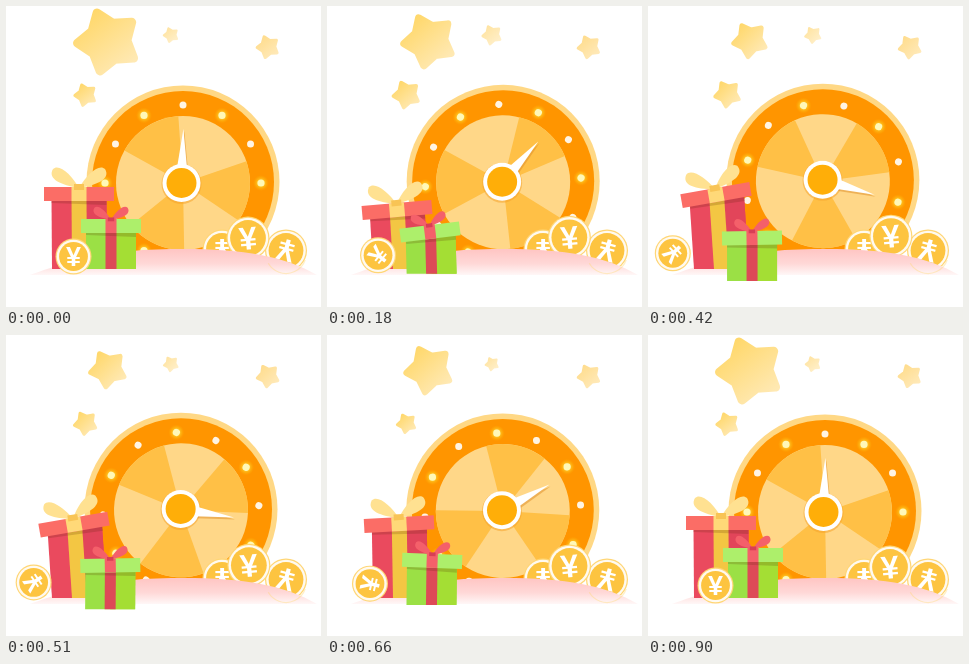
These frames come from a looping animation (315x301 px, 0.93 s). An HTML page with a canvas:

```html
<!DOCTYPE html>
<html lang="en">
<head>
<meta charset="utf-8">
<style>
  html, body { margin: 0; width: 100%; height: 100%; overflow: hidden; background: #fff; }
  canvas { display: block; }
</style>
</head>
<body>
<canvas id="stage" width="315" height="301"></canvas>
<script>
const c = document.getElementById('stage').getContext('2d');
const LOOP = 930, STEP = 30, PEAK = 450, END = 900;
const TIMES = [0, 180, 300, 420, 570, 780, 900];
const SECTORS = [-4, 71, 124, 179, 231, 299, 356];
const rad = deg => deg * Math.PI / 180;

function track(t, values) {
  let i = 0;
  while (i < TIMES.length - 2 && t > TIMES[i + 1]) i++;
  const k = (t - TIMES[i]) / (TIMES[i + 1] - TIMES[i]);
  return values[i] + (values[i + 1] - values[i]) * k;
}

function at(x, y, deg, draw) {
  c.save();
  c.translate(x, y);
  c.rotate(rad(deg));
  draw();
  c.restore();
}

function disc(x, y, r, fill) {
  c.beginPath();
  c.arc(x, y, r, 0, 2 * Math.PI);
  c.fillStyle = fill;
  c.fill();
}

function poly(points, fill) {
  c.beginPath();
  points.forEach(p => c.lineTo(...p));
  c.closePath();
  c.fillStyle = fill;
  c.fill();
}

function fade(x0, y0, x1, y1, ...colors) {
  const g = c.createLinearGradient(x0, y0, x1, y1);
  colors.forEach((col, i) => g.addColorStop(i / (colors.length - 1), col));
  return g;
}

function star(x, y, r, deg, from = '#ffd768', to = '#ffeab8') {
  at(x, y, deg, () => {
    const fill = fade(-r * .3, -r, r * .3, r, from, to);
    const points = [];
    for (let i = 0; i < 10; i++) {
      const a = rad(i * 36), d = r * (i % 2 ? .56 : .9);
      points.push([Math.sin(a) * d, -Math.cos(a) * d]);
    }
    poly(points, fill);
    c.lineJoin = 'round';
    c.lineWidth = r * .26;
    c.strokeStyle = fill;
    c.stroke();
  });
}

function coin(x, y, r, deg) {
  disc(x, y, r, '#ffd675');
  disc(x, y, r - 1.2, '#fffaf0');
  disc(x, y, r - 3.6, '#fdc440');
  at(x, y, deg, () => {
    c.font = `bold ${r * 1.5}px "Liberation Sans", Arial, sans-serif`;
    c.textAlign = 'center';
    c.fillStyle = '#fff';
    c.fillText('¥', 0, r * .53);
  });
}

function wheel(x, y, lightsDeg, sectorsDeg) {
  disc(x, y - 1, 96.5, '#ffd885');
  disc(x, y - 1, 91, '#ff9500');
  at(x, y, sectorsDeg, () => {
    disc(0, 0, 67, '#ffd788');
    for (let i = 1; i < SECTORS.length; i += 2) {
      c.beginPath();
      c.moveTo(0, 0);
      c.arc(0, 0, 67, rad(SECTORS[i] - 90), rad(SECTORS[i + 1] - 90));
      c.fillStyle = '#ffc046';
      c.fill();
    }
  });
  at(x, y, lightsDeg, () => {
    for (let i = 0; i < 12; i++) {
      const a = rad(i * 30), dx = Math.sin(a) * 78, dy = -Math.cos(a) * 78;
      if (i % 2) {
        const glow = c.createRadialGradient(dx, dy, 2, dx, dy, 8);
        glow.addColorStop(0, '#ffdf40');
        glow.addColorStop(1, '#ffb00000');
        disc(dx, dy, 8, glow);
        disc(dx, dy, 3.6, '#fff8b8');
      } else disc(dx, dy, 3.5, '#fff4e4');
    }
  });
}

function needle(x, y, deg) {
  disc(x, y + 1, 20, '#f5a32b88');
  at(x + 1, y + 2, deg, () => poly([[-5, -15], [0, -54], [5, -15]], '#e0902c88'));
  at(x, y, deg, () => poly([[-5, -15], [0, -54], [5, -15]], '#fff'));
  disc(x, y, 19, '#fff');
  disc(x, y, 15, '#ffae08');
}

function mound() {
  c.fillStyle = '#fff';
  c.fillRect(0, 268, 315, 33);
  c.beginPath();
  c.moveTo(24, 269);
  c.bezierCurveTo(45, 262, 85, 244, 165, 243);
  c.bezierCurveTo(232, 242, 277, 249, 311, 269);
  c.closePath();
  c.fillStyle = fade(0, 243, 0, 272, '#ffc5c3', '#ffd8d7', '#fff');
  c.fill();
}

// The lid tilts freely while the foot of the box stays level.
function gift(x, y, deg, foot, g) {
  const cos = Math.cos(rad(deg)), sin = Math.sin(rad(deg));
  const top = (px, py = 5) => [x + px * cos - py * sin, y + px * sin + py * cos];
  const side = (l, r, fill) =>
    poly([top(l), top(r), [foot[0] + r, foot[1]], [foot[0] + l, foot[1]]], fill);
  side(-g.body, g.body, g.bodyColor);
  side(0, g.body, g.shade);
  side(-g.band, g.band, g.bandColor);
  poly([top(-g.body), top(g.body), top(g.body, 11), top(-g.body, 9)], '#50200030');
  at(x, y, deg, () => {
    c.fillStyle = g.lidColor;
    c.fillRect(-g.lid, -7, 2 * g.lid, 14);
    c.fillStyle = g.ribbon;
    c.fillRect(-g.band, -7, 2 * g.band, 14);
    c.translate(0, -6);
    for (const dir of [-1, 1]) {
      c.save();
      c.scale(dir * g.bow, g.bow);
      c.beginPath();
      c.moveTo(0, 0);
      c.bezierCurveTo(7, -13, 20, -25, 26, -19);
      c.bezierCurveTo(32, -9, 18, -3, 0, 0);
      c.fillStyle = g.bowColor;
      c.fill();
      c.restore();
    }
    c.fillStyle = g.knot;
    c.fillRect(-5 * g.bow, -4 * g.bow, 10 * g.bow, 6 * g.bow);
  });
}

const RED = { body: 27.5, lid: 35, band: 7.5, bow: 1, bodyColor: '#ea4a5e', shade: '#e2455a',
  lidColor: '#fb6d66', ribbon: '#ffd978', bandColor: '#f3c643', bowColor: '#ffe191', knot: '#f8c455' };
const GREEN = { body: 25, lid: 30, band: 5.5, bow: .64, bodyColor: '#9be045', shade: '#a4de34',
  lidColor: '#adef6b', ribbon: '#f4606a', bandColor: '#dd4a57', bowColor: '#f4606a', knot: '#d83f55' };

function draw(t) {
  const p = t < PEAK ? Math.max(0, (t - STEP) / (PEAK - STEP)) : (END - t) / (END - PEAK);
  const on = (...values) => track(t, values);
  c.fillStyle = '#fff';
  c.fillRect(0, 0, 315, 301);

  const lean = -21 - 9 * p;
  star(102, 35.5 - 1.5 * p, 34 - 16.7 * p, lean);
  star(165, 29, on(8, 10.3, 9.3, 8.7, 7.5, 6.8, 8), lean, '#ffe3a0', '#fff0cc');
  star(262, 41, 12, lean, '#ffdc8c', '#ffeabb');
  star(79.5, 89 - p, on(11.8, 14.5, 16.5, 14, 11.3, 9.2, 11.8), lean);

  wheel(177 - 2.3 * p, 177 - 2 * p, -177 * p, -160 * p);
  needle(175.5 - p, 177 - 3.5 * p, 2 + 112 * p);
  coin(216, 243, 19.5, 180);
  coin(280, 244.5, 21, 195);
  coin(242 + p, 232 - 2 * p, 21.5, -5);
  mound();
  c.beginPath();
  c.arc(280, 247, 20.5, rad(20), rad(150));
  c.lineWidth = 1.2;
  c.strokeStyle = '#ffd67566';
  c.stroke();

  gift(on(73, 70, 69.5, 68, 68, 77.5, 73), on(188, 204, 193, 189, 190, 188, 188),
    on(0, -5, -8, -10, -10, 6, 0), [73.5, 263], RED);
  gift(on(105, 103, 103, 104, 104.5, 106, 105), on(220, 226, 231, 232, 229.5, 221, 220),
    on(0, -7, -8, -1, -1, 6, 0), [105 - p, 263 + 13 * p], GREEN);
  coin(67.5 - 46 * p, 250.5 - 3.5 * p, 18, -143 * p);
}

function tick(now) {
  draw(Math.floor(now % LOOP / STEP) * STEP);
  requestAnimationFrame(tick);
}
draw(0);
requestAnimationFrame(tick);
</script>
</body>
</html>
```
